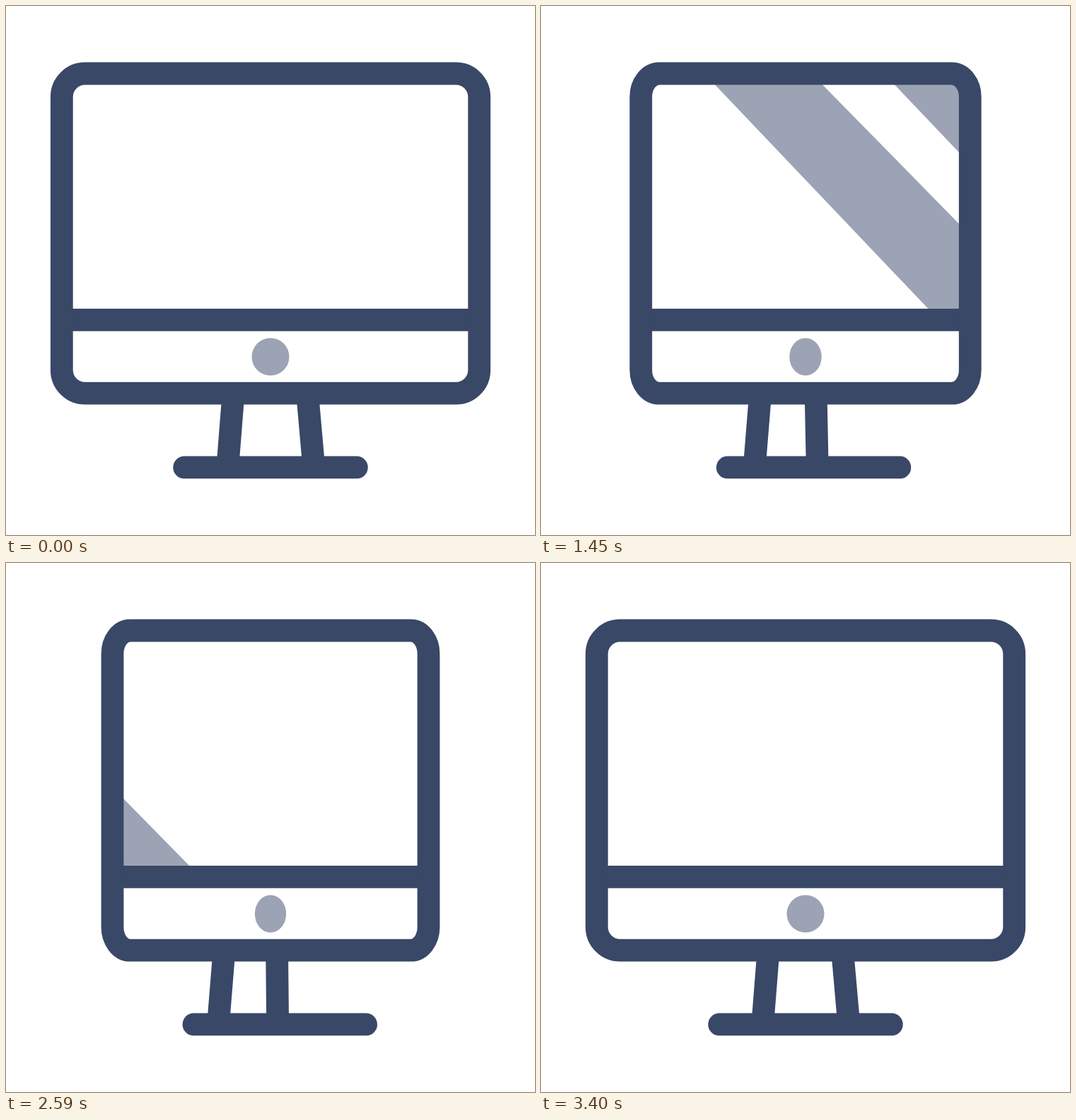
An HTML page for the animation above (3.43 s loop, 748x748 px).

```html
<!DOCTYPE html>
<html lang="en">
<head>
<meta charset="utf-8">
<title>Monitor</title>
<style>
  html, body { margin: 0; width: 100%; height: 100%; overflow: hidden; background: #fff; }
  svg { display: block; width: 100%; height: 100%; }
  .line { fill: none; stroke: #394867; stroke-width: 31.8; }
  .tint { fill: #9ca3b5; }
</style>
</head>
<body>
<svg viewBox="0 0 748 748">
  <clipPath id="screen"><rect id="glass" y="95.5" height="348" ry="33"/></clipPath>
  <g class="tint" clip-path="url(#screen)">
    <path id="wide"/>
    <path id="narrow"/>
    <path id="back"/>
  </g>
  <ellipse id="button" class="tint" cx="374" cy="496" ry="26.5"/>
  <path id="legs" class="line"/>
  <path id="base" class="line" stroke-linecap="round"/>
  <path id="bar" class="line"/>
  <rect id="frame" class="line" y="95.5" height="452.2" ry="33"/>
</svg>
<script>
  const LOOP = 3430, STEP = 30, HOLD = 1000;
  const $ = id => document.getElementById(id);
  const set = (id, attrs) => {
    for (const k in attrs) $(id).setAttribute(k, attrs[k]);
  };
  const mix = (a, b, p) => a + (b - a) * p;

  // Cubic Bezier easing with flat ends: (x1, 0, x2, 1)
  function ease(u, x1, x2) {
    if (u <= 0) return 0;
    if (u >= 1) return 1;
    let lo = 0, hi = 1, s;
    for (let i = 0; i < 30; i++) {
      s = (lo + hi) / 2;
      const x = 3 * x1 * s * (1 - s) ** 2 + 3 * x2 * s * s * (1 - s) + s ** 3;
      if (x < u) lo = s; else hi = s;
    }
    return s * s * (3 - 2 * s);
  }

  // Slanted band; l and r are its edges at the bottom of the glass
  const band = (l, r) =>
    `M${l - 301} 111H${r - 310}L${r + 16} 443H${l + 15}Z`;

  function draw(t) {
    const p = ease((t - HOLD) / 1000, .332, .126) - ease((t - 2400) / 920, .376, .464);
    const half = mix(295.2, 214.2, p);
    const box = { x: 374 - half, width: 2 * half, rx: 33 * half / 295.2 };
    set('frame', box);
    set('glass', box);
    set('bar', { d: `M${374 - half} 443.8H${374 + half}` });
    set('button', { rx: mix(26.5, 21.6, p) });
    set('legs', {
      d: `M${mix(321.5, 306.8, p)} 548L${mix(313.3, 298.3, p)} 652` +
         `M${mix(426.1, 377.5, p)} 548L${mix(435.3, 377.5, p)} 652`
    });
    const bx = mix(252.2, 267.2, p);
    set('base', { d: `M${bx} 652.4h243.6` });

    const out = t > HOLD && t < 2200, k = t - 1600;
    const x = 304 - 1.643 * k - .000167 * k * k;
    set('wide', { d: out ? band(x, x + 161) : '' });
    set('narrow', { d: out ? band(x + 254, x + 383) : '' });
    const y = 258 + 1.3625 * (t - 2590);
    set('back', { d: t > 2200 ? band(y - 304, y) : '' });
  }

  const start = performance.now();
  function tick() {
    const t = (performance.now() - start) % LOOP;
    draw(t < HOLD ? 0 : HOLD + Math.floor((t - HOLD) / STEP) * STEP);
    requestAnimationFrame(tick);
  }
  tick();
</script>
</body>
</html>
```
